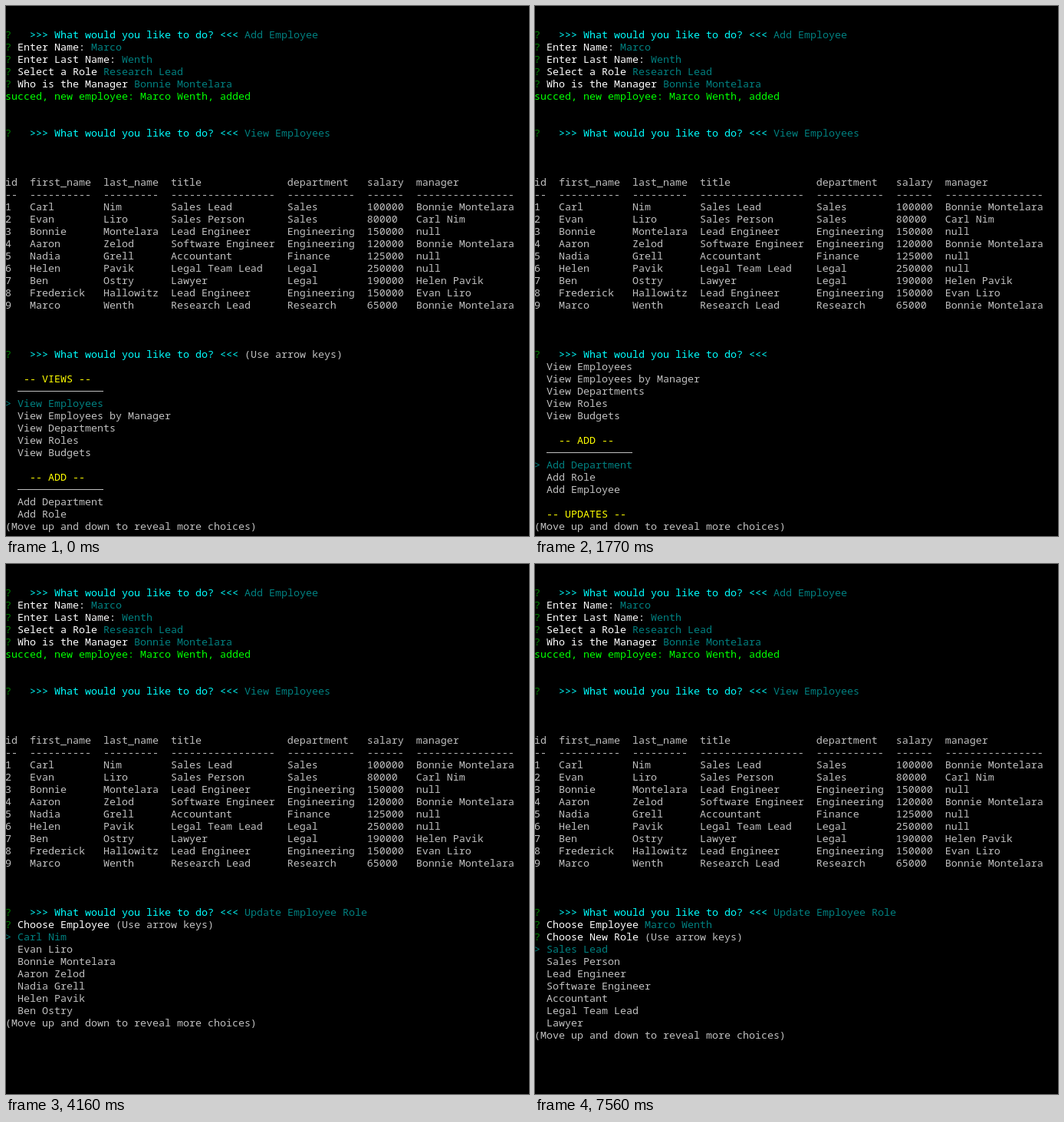
An HTML page for the animation above (8000 ms loop, 682 by 690 pixels).

```html
<!DOCTYPE html>
<html lang="en">
<head>
<meta charset="utf-8">
<title>Employee tracker</title>
<style>
  html, body { margin: 0; width: 100%; height: 100%; overflow: hidden; background: #000; }
  svg { display: block; width: 682px; height: 690px; }
  text { white-space: pre; font: 13.3333px "Noto Sans Mono", "DejaVu Sans Mono", monospace; }
  .plain { fill: #c0c0c0; }
  .mark { fill: #008000; }
  .prompt { fill: #00ffff; }
  .answer { fill: #008080; }
  .bold { fill: #ffffff; }
  .done { fill: #00ff00; }
  .title { fill: #ffff00; }
</style>
</head>
<body>
<svg id="screen" viewBox="0 0 682 690"></svg>
<script>
const LOOP = 8000, CELL = 8, ROW = 16, BASE = 42;
const screen = document.getElementById('screen');

const people = [
  ['Carl', 'Nim', 'Sales Lead', 'Sales', 100000, 2],
  ['Evan', 'Liro', 'Sales Person', 'Sales', 80000, 0],
  ['Bonnie', 'Montelara', 'Lead Engineer', 'Engineering', 150000],
  ['Aaron', 'Zelod', 'Software Engineer', 'Engineering', 120000, 2],
  ['Nadia', 'Grell', 'Accountant', 'Finance', 125000],
  ['Helen', 'Pavik', 'Legal Team Lead', 'Legal', 250000],
  ['Ben', 'Ostry', 'Lawyer', 'Legal', 190000, 5],
  ['Frederick', 'Hallowitz', 'Lead Engineer', 'Engineering', 150000, 1],
  ['Marco', 'Wenth', 'Research Lead', 'Research', 65000, 2]
];
const names = people.map(p => p[0] + ' ' + p[1]);
const roles = [...new Set(people.map(p => p[2]))];
const newest = names[8];

// A line is a list of [style, text] runs.
const plain = s => [['plain', s]];
const ask = (question, answer, style = 'answer') =>
  [['mark', '? '], ['bold', question + ' '], [style, answer]];
const mainAsk = (answer, style = 'answer') =>
  [['mark', '? '], ['prompt', '  >>> What would you like to do? <<< '], [style, answer]];
const choice = (s, on) => on ? [['answer', '> ' + s]] : plain('  ' + s);
const hint = '(Use arrow keys)';
const more = plain('(Move up and down to reveal more choices)');

const widths = [2, 10, 9, 17, 11, 6, 16];
const tableRow = cells => plain(cells.map((c, i) => String(c).padEnd(widths[i] + 2)).join(''));
const table = [
  tableRow(['id', 'first_name', 'last_name', 'title', 'department', 'salary', 'manager']),
  tableRow(widths.map(w => '-'.repeat(w))),
  ...people.map((p, i) => tableRow([i + 1, ...p.slice(0, 5), names[p[5]] ?? 'null']))
];

const history = [
  mainAsk('Add Employee'),
  ask('Enter Name:', people[8][0]),
  ask('Enter Last Name:', people[8][1]),
  ask('Select a Role', people[8][2]),
  ask('Who is the Manager', names[2]),
  [['done', `succed, new employee: ${newest}, added`]],
  [], [],
  mainAsk('View Employees'),
  [], [], [],
  ...table,
  [], [], []
];

const section = (title, pad) => ['', ' '.repeat(pad) + `-- ${title} --`, 'rule'];
const menu = [
  ...section('VIEWS', 3),
  'View Employees', 'View Employees by Manager', 'View Departments', 'View Roles', 'View Budgets',
  ...section('ADD', 4),
  'Add Department', 'Add Role', 'Add Employee',
  ...section('UPDATES', 2),
  'Update Employee Role', 'Update Employee Manager',
  ...section('DELETE', 2)
];

function menuPage(active, top) {
  return menu.slice(top, top + 13).map((s, i) =>
    s === 'rule' ? s :
    s.includes('--') ? [['title', s]] :
    s ? choice(s, top + i === active) : []);
}
const mainMenu = (active, top, tip = '') =>
  [mainAsk(tip, 'plain'), ...menuPage(active, top), more];

// Endless list of seven entries with the first one selected.
const picker = (list, first) => [
  ...Array.from({ length: 7 }, (_, i) => choice(list[(first + i) % list.length], i === 0)),
  more
];
const updating = mainAsk('Update Employee Role');

const steps = [
  [0, mainMenu(3, 0, hint)],
  [500, mainMenu(4, 0)],
  [790, []],
  [840, mainMenu(5, 0)],
  [1070, mainMenu(6, 0)],
  [1350, mainMenu(7, 0)],
  [1620, mainMenu(11, 3)],
  [1890, mainMenu(12, 4)],
  [2160, mainMenu(13, 5)],
  [2440, mainMenu(17, 8)],
  [4160, [updating, ask('Choose Employee', hint, 'plain'), ...picker(names, 0)]],
  [6030, [updating, ask('Choose Employee', ''), ...picker(names, 8)]],
  [7090, [updating, ask('Choose Employee', newest),
    ask('Choose New Role', hint, 'plain'), ...picker(roles, 0)]]
];

const escape = s => s.replace(/</g, '&lt;').replace(/>/g, '&gt;');

function drawLine(line, row) {
  const y = BASE + row * ROW;
  if (line === 'rule') return `<rect class="plain" x="15" y="${y - 5}" width="112" height="1"/>`;
  let col = 0;
  return line.map(([style, s]) => {
    const x = col * CELL - 1;
    col += s.length;
    return `<text class="${style}" x="${x}" y="${y}">${escape(s)}</text>`;
  }).join('');
}

let shown;
function tick() {
  const t = performance.now() % LOOP;
  const step = steps.findLast(([start]) => t >= start);
  if (step !== shown) {
    shown = step;
    screen.innerHTML = [...history, ...step[1]].map(drawLine).join('');
  }
  requestAnimationFrame(tick);
}
tick();
</script>
</body>
</html>
```
